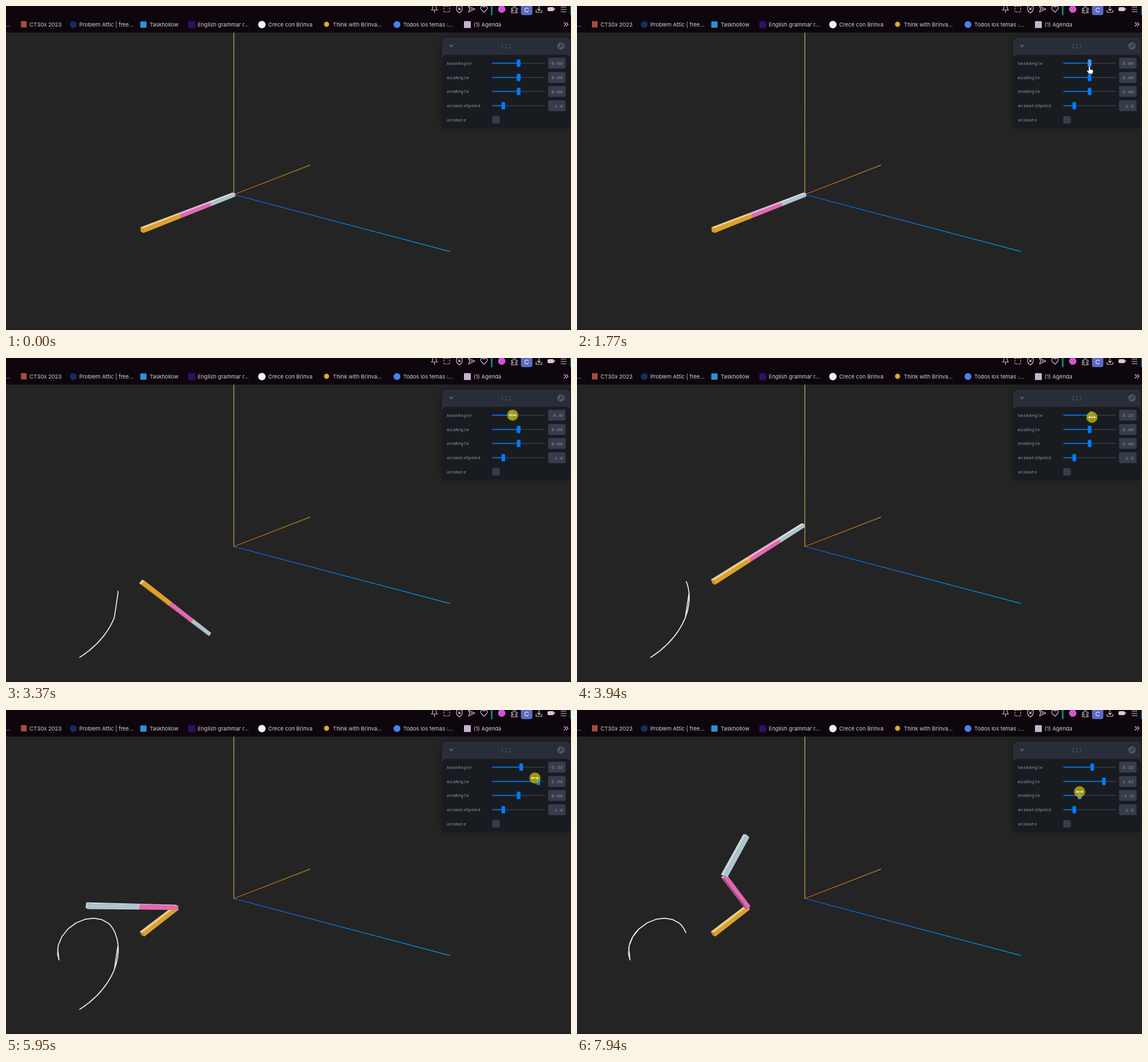
Animation, 987 px wide and 567 px high, one loop 8000 ms. Source, as an HTML page with a canvas:

```html
<!DOCTYPE html>
<html lang="en">
<head>
<meta charset="utf-8">
<title>Robot arm controls</title>
<style>
html, body { margin: 0; width: 100%; height: 100%; overflow: hidden; background: #242424; }
canvas { display: block; }
</style>
</head>
<body>
<canvas id="stage" width="987" height="567"></canvas>
<script>
const ctx = document.getElementById('stage').getContext('2d');
const LOOP = 8000;
const UI_FONT = '9.5px Inter, sans-serif';
const MONO = '8.1px "Liberation Mono", monospace';

// Keyframes: [time, value, ...]; linear in between.
const BASE = [[2203, 0], [2270, -.04], [2337, -.55], [3000, -1.45], [3130, -1.45], [3370, -.89], [4000, .33]];
const MID = [[4900, 0], [4930, .13], [5000, .27], [5280, .27], [5880, 2.99], [5950, 2.52], [6060, 2.25], [6350, 1.82]];
const END = [[7140, 0], [7940, -1.28]];
const TAIL = [[6080, 2203], [6870, 3230], [7090, 3370], [7740, 4010]];
const POINTER = [
  [300, 934, 556], [700, 884, 260], [1040, 878, 130], [1110, 893, 124], [1500, 897, 112], [1770, 895, 106],
  [2230, 895, 100], [2337, 888, 100], [3000, 876, 101], [3130, 876, 101], [3370, 885, 100], [4000, 901, 104],
  [4470, 901, 114], [5280, 901, 117], [5880, 932, 118], [5950, 924, 119], [6350, 920, 118],
  [6950, 899, 141], [7090, 898, 142], [7140, 895, 143], [7940, 878, 143]
];
const DRAGS = [[2240, 4060], [4900, 6400], [7130, 8000]];

function track(keys, t, i = 1) {
  if (t <= keys[0][0]) return keys[0][i];
  for (let k = 1; k < keys.length; k++) {
    const a = keys[k - 1], b = keys[k];
    if (t < b[0]) return a[i] + (b[i] - a[i]) * (t - a[0]) / (b[0] - a[0]);
  }
  return keys[keys.length - 1][i];
}

// Orbit camera aimed at the origin.
const YAW = -.8812, SIN_P = .32, COS_P = Math.sqrt(1 - SIN_P * SIN_P);
const SIN_Y = Math.sin(YAW), COS_Y = Math.cos(YAW);
const DIST = 8.02, FOCAL = 490, CX = 398, CY = 330;
const EYE = [DIST * COS_P * SIN_Y, DIST * SIN_P, DIST * COS_P * COS_Y];

function project([x, y, z]) {
  const right = COS_Y * x - SIN_Y * z;
  const up = -SIN_P * SIN_Y * x + COS_P * y - SIN_P * COS_Y * z;
  const depth = DIST - COS_P * SIN_Y * x - SIN_P * y - COS_P * COS_Y * z;
  return [CX + FOCAL * right / depth, CY - FOCAL * up / depth, depth];
}

function polyline(points, close) {
  ctx.beginPath();
  points.forEach(p => ctx.lineTo(p[0], p[1]));
  if (close) ctx.closePath();
}

function fillPoly(points, color) {
  polyline(points, true);
  ctx.fillStyle = color;
  ctx.fill();
}

function strokeLine(points, color, width = 1) {
  polyline(points);
  ctx.strokeStyle = color;
  ctx.lineWidth = width;
  ctx.stroke();
}

function box(x, y, w, h, r, color) {
  ctx.beginPath();
  ctx.roundRect(x, y, w, h, r);
  ctx.fillStyle = color;
  ctx.fill();
}

function disc(x, y, r, color) {
  ctx.beginPath();
  ctx.arc(x, y, r, 0, 7);
  ctx.fillStyle = color;
  ctx.fill();
}

function label(text, x, y, font, color, align = 'left') {
  ctx.font = font;
  ctx.fillStyle = color;
  ctx.textAlign = align;
  ctx.textBaseline = 'alphabetic';
  ctx.fillText(text, x, y);
}

function drawAxis(end, from, to) {
  const a = project([0, 0, 0]), b = project(end);
  const gradient = ctx.createLinearGradient(a[0], a[1], b[0], b[1]);
  gradient.addColorStop(0, from);
  gradient.addColorStop(1, to);
  strokeLine([a, b], gradient, 1.1);
}

// Joint positions along the chain, with the direction of each segment.
function armAt(t) {
  const turns = [track(BASE, t), track(MID, t), track(END, t)];
  let x = -3, y = 0, angle = 0;
  return turns.map(turn => {
    angle += turn;
    const segment = { x, y, angle };
    x += Math.cos(angle);
    y += Math.sin(angle);
    return segment;
  });
}

function shade(rgb, ny) {
  const toward = ny > 0 ? 255 : 0, k = Math.abs(ny) * .48;
  return `rgb(${rgb.map(c => Math.round(c + (toward - c) * k))})`;
}

function drawSegment({ x, y, angle }, rgb) {
  const c = Math.cos(angle), s = Math.sin(angle), h = .05;
  const world = (u, v, w) => [x + u * c - v * s, y + u * s + v * c, w];
  const faces = [
    [[0, 0, 1], [[0, -h, h], [1, -h, h], [1, h, h], [0, h, h]]],
    [[0, 1, 0], [[0, h, h], [1, h, h], [1, h, -h], [0, h, -h]]],
    [[0, -1, 0], [[0, -h, h], [1, -h, h], [1, -h, -h], [0, -h, -h]]],
    [[1, 0, 0], [[1, -h, h], [1, h, h], [1, h, -h], [1, -h, -h]]],
    [[-1, 0, 0], [[0, -h, h], [0, h, h], [0, h, -h], [0, -h, -h]]]
  ];
  for (const [n, corners] of faces) {
    const points = corners.map(p => world(...p));
    const normal = [n[0] * c - n[1] * s, n[0] * s + n[1] * c, n[2]];
    const facing = normal.reduce((sum, v, i) => sum + v * (EYE[i] - points[0][i]), 0);
    if (facing > 0) fillPoly(points.map(project), shade(rgb, normal[1]));
  }
}

function drawTrail(t) {
  if (t < 2270) return;
  const points = [], step = 67, start = 2203;
  const mark = time => {
    const { x, y } = armAt(time)[2];
    points.push(project([x - .214, y - 2.53, -4.81]));
  };
  const first = start + step * Math.floor((track(TAIL, t) - start) / step);
  for (let s = first; s < t; s += step) mark(s);
  mark(t);
  ctx.lineJoin = 'round';
  strokeLine(points, '#ececec', 1.7);
}

function drawScene(t) {
  ctx.fillStyle = '#242424';
  ctx.fillRect(0, 0, 987, 567);
  drawAxis([5, 0, 0], '#f2590c', '#c6a922');
  drawAxis([0, 5, 0], '#dcb24c', '#cfd27a');
  drawAxis([0, 0, 5], '#0070ff', '#00a2f4');
  drawTrail(t);
  const colors = [[222, 161, 42], [226, 104, 178], [174, 196, 205]];
  armAt(t)
    .map((seg, i) => ({ seg, rgb: colors[i], depth: project([seg.x + Math.cos(seg.angle) / 2, seg.y + Math.sin(seg.angle) / 2, 0])[2] }))
    .sort((a, b) => b.depth - a.depth)
    .forEach(({ seg, rgb }) => drawSegment(seg, rgb));
}

function drawToolbar() {
  const ink = '#d6c8d4';
  const svg = (path, x, y) => {
    ctx.save();
    ctx.translate(x, y);
    ctx.strokeStyle = ink;
    ctx.lineWidth = 1.1;
    ctx.stroke(new Path2D(path));
    ctx.restore();
  };
  svg('M-3 -6H3V-1L5 2H-5L-3 -1ZM0 2V7', 748.5, 5);
  ctx.setLineDash([2.5, 1.8]);
  svg('M-5 -5H5V5H-5Z', 770, 5.5);
  ctx.setLineDash([]);
  svg('M0 -6L5 -4V1Q4 5 0 7Q-4 5 -5 1V-4ZM-2 -2L2 2M2 -2L-2 2', 792, 5);
  svg('M-5 -5L6 0L-5 5L-3 0ZM-3 0H2', 813, 5.5);
  svg('M0 6L-5 1C-8 -4 -2 -7 0 -3C2 -7 8 -4 5 1Z', 835, 5);
  svg('M-5 -2H-2C-3 -6 3 -6 2 -2H5V1C1 0 1 5 5 4V6H-5V3C-1 4 -1 0 -5 1Z', 888, 6);
  svg('M0 -6V3M-3 0L0 3L3 0M-5 2V6H5V2', 931, 5);
  svg('M-5 -3.5H5M-5 .5H5M-5 4.5H5', 974, 5.5);
  box(847, 0, 3, 16, 0, '#0d8078');
  box(985.5, 0, 2, 16, 0, '#0d8078');
  disc(866, 5.5, 6.5, '#d154d6');
  box(899.5, -5, 20, 21, 4, '#5c6bc0');
  label('C', 909.5, 10.5, '11px Inter, sans-serif', '#fff', 'center');
  box(946, 2, 11, 7, 2, ink);
  box(957.5, 4, 1.5, 3, 0, ink);
  svg('M-3.5 -3.5L0 0L-3.5 3.5M.5 -3.5L4 0L.5 3.5', 978, 32);
}

function drawBookmarks() {
  const items = [
    ['CT30x 2023', 41], ['Problem Attic | free...', 128], ['Taskhollow', 251],
    ['English grammar r...', 335], ['Crece con Brinva', 458], ['Think with Brinva...', 571],
    ['Todos los temas :...', 694], ['(1) Agenda', 817]
  ];
  label('...', 0, 36, UI_FONT, '#d9cdd7');
  items.forEach(([text, x]) => label(text, x, 36, UI_FONT, '#d9cdd7'));
  box(26, 26.5, 10, 11, 1, '#a9483f');
  disc(117.5, 32.5, 6, '#1b2a5e');
  box(234.5, 27, 11, 11, 1, '#2f8fd8');
  box(318.5, 26.5, 12, 12, 2, '#2b1068');
  disc(447, 32.5, 6.5, '#f4f4f4');
  disc(560, 32, 4.5, '#d9a92c');
  disc(683, 32.5, 6, '#4285f4');
  box(800, 26.5, 12, 12, 1, '#c3b6cf');
}

function drawBrowser() {
  ctx.fillStyle = '#0e060d';
  ctx.fillRect(0, 0, 987, 46.5);
  ctx.fillStyle = '#1b151a';
  ctx.fillRect(0, 566, 987, 1);
  drawToolbar();
  drawBookmarks();
}

function drawValue(text, y) {
  box(947, y - 9.5, 30.5, 19, 2.5, '#373c4b');
  ctx.save();
  ctx.beginPath();
  ctx.rect(947, y - 9, 26, 18);
  ctx.clip();
  const wide = text.length > 4;
  label(text, wide ? 951.5 : 972.5, y + 3.3, MONO, '#8c92a4', wide ? 'left' : 'right');
  ctx.restore();
}

function drawSlider(name, y, handleX, text, hovered) {
  label(name, 770, y + 2.7, MONO, '#8c92a4');
  box(849.5, y - .8, 92, 1.6, .8, '#373c4b');
  box(849.5, y - .8, handleX - 849.5, 1.6, .8, '#007bff');
  box(handleX - 3.2, y - 6.4, 6.4, 12.8, 1.6, hovered ? '#3d93ff' : '#007bff');
  drawValue(text, y);
}

function drawPanel(t) {
  ctx.save();
  ctx.shadowColor = 'rgba(0,0,0,.4)';
  ctx.shadowBlur = 8;
  box(762, 55, 223.5, 158, 8, '#181c20');
  ctx.restore();
  box(762, 55, 223.5, 40, [8, 8, 0, 0], '#292d39');
  box(762, 85.5, 223.5, 127.5, 8, '#181c20');
  const dim = '#535760';
  fillPoly([[773, 68], [782, 68], [777.5, 73]], dim);
  for (const x of [867, 873.5, 880]) for (const y of [68, 73]) disc(x, y, 1.2, dim);
  disc(969.5, 70, 6.4, dim);
  ctx.beginPath();
  ctx.arc(970.5, 69, 2.1, 0, 7);
  ctx.strokeStyle = '#292d39';
  ctx.lineWidth = 1.2;
  ctx.stroke();
  strokeLine([[969, 70.5], [966, 73.5]], '#292d39', 1.2);

  const knob = angle => 895.5 + 13.7 * angle;
  const format = v => (Math.abs(v) < .005 ? 0 : v).toFixed(2);
  const base = track(BASE, t), mid = track(MID, t), end = track(END, t);
  drawSlider('baseAngle', 100, knob(base), format(base), t > 1500 && t < 4200);
  drawSlider('midAngle', 125, knob(mid), format(track(MID, t - 70)), false);
  drawSlider('endAngle', 149.5, knob(end), format(end), t > 7000);
  drawSlider('animateSpeed', 174.5, 868.7, '1.0', false);
  label('animate', 770, 201.7, MONO, '#8c92a4');
  box(849.5, 192.7, 13, 13, 2.5, '#373c4b');
}

function drawPointer(t) {
  if (t < 300) return;
  const x = track(POINTER, t, 1), y = track(POINTER, t, 2);
  ctx.save();
  ctx.translate(x, y);
  if (DRAGS.some(([from, to]) => t >= from && t < to)) {
    disc(0, 0, 9.8, 'rgba(178,166,12,.86)');
    strokeLine([[-4, 0], [4, 0]], '#f4f4e4', 1.1);
    fillPoly([[-6.5, 0], [-3.5, -2.4], [-3.5, 2.4]], '#f4f4e4');
    fillPoly([[6.5, 0], [3.5, -2.4], [3.5, 2.4]], '#f4f4e4');
  } else {
    const shape = t < 1450
      ? 'M0 0V13L3 10.3L5 14.5L7 13.6L5.2 9.6H9.3Z'
      : 'M-1 1Q0 -1 1.2 1V5L5.5 6Q6.8 6.5 6.5 8L5.5 12.5H-.5L-4 8Q-4 6.3 -2.5 7L-1 8Z';
    const path = new Path2D(shape);
    ctx.lineWidth = 1.4;
    ctx.strokeStyle = '#15151a';
    ctx.stroke(path);
    ctx.fillStyle = '#fff';
    ctx.fill(path);
  }
  ctx.restore();
}

function frame() {
  const t = performance.now() % LOOP;
  drawScene(t);
  drawBrowser();
  drawPanel(t);
  drawPointer(t);
  requestAnimationFrame(frame);
}
frame();
</script>
</body>
</html>
```
